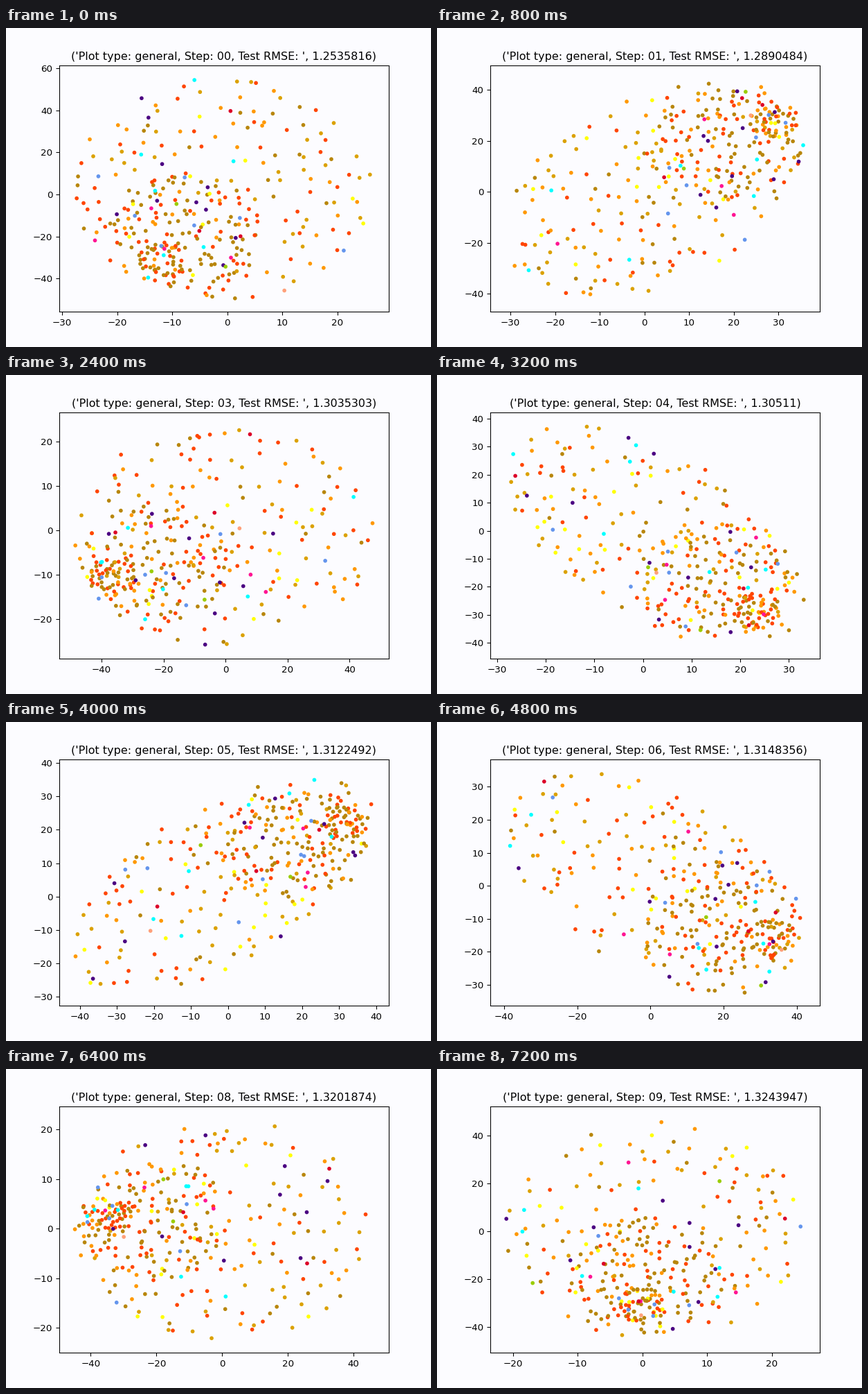
A matplotlib script for the animation above (8000 ms loop, 614 by 460 pixels).

```python
import numpy as np
import matplotlib.pyplot as plt
from matplotlib.animation import FuncAnimation

W, H, DPI = 614, 460, 96
PAPER = "#fcfcff"
MARGIN = 1 / 1.1                        # data fills the axes up to a 5 % border

COMMON = ["#b8860b", "#ff9800", "#ff4500", "#dba100", "#ffff00"]
DENSE = [.42, .18, .30, .06, .04]       # goldenrod and orange-red near the pole
SPARSE = [.14, .25, .24, .28, .09]      # lighter tones further out
RARE = (["#00ffff"] * 7 + ["#4b0082"] * 10 + ["#6495ed"] * 7
        + ["#ff1493"] * 4 + ["#dc0028"] * 3 + ["#9acd00"] * 2 + ["#ffa07a"])

# RMSE, x limits, y limits, slant of the cloud, dense pole (axes run -1 to 1)
STEPS = [
    (1.2535816, (-30.54, 29.35), (-55.8, 61.1), 0, (-.38, -.60)),
    (1.2890484, (-34.53, 39.24), (-47.2, 49.5), .4, (.72, .56)),
    (1.2967218, (-41.2, 37.6), (-44.5, 46.8), -.4, (-.70, .50)),
    (1.3035303, (-53.69, 52.65), (-28.94, 26.5), 0, (-.68, -.34)),
    (1.30511, (-31.46, 36.36), (-45.67, 42.06), -.55, (.62, -.62)),
    (1.3122492, (-45.56, 43.38), (-32.8, 41.0), .6, (.73, .50)),
    (1.3148356, (-43.8, 46.3), (-36.4, 38.2), -.5, (.70, -.45)),
    (1.3164245, (-51.11, 52.06), (-23.5, 23.7), 0, (.77, .04)),
    (1.3201874, (-49.6, 50.7), (-25.1, 24.6), 0, (-.70, .10)),
    (1.3243947, (-23.5, 27.39), (-50.7, 51.97), 0, (-.08, -.62)),
]


def disc(rng, n, center, radius, slant=0):
    """Spaced random dots in a disc; each is the freer of two candidates."""
    pts = []
    for _ in range(n):
        a = rng.uniform(0, 2 * np.pi, 2)
        r = radius * np.sqrt(rng.uniform(0, 1, 2))
        x, y = r * np.cos(a), r * np.sin(a)
        cand = np.column_stack([x, slant * x + np.sqrt(1 - slant**2) * y])
        if pts:
            gaps = np.linalg.norm(cand[:, None] - np.array(pts), axis=2)
            pts.append(cand[gaps.min(axis=1).argmax()])
        else:
            pts.append(cand[0])
    return np.array(pts) + center


def make_cloud(step, xlim, ylim, slant, pole):
    rng = np.random.default_rng(70 + step)
    pole = np.array(pole)
    pts = np.vstack([disc(rng, 175, 0, MARGIN, slant),
                     disc(rng, 125, .6 * pole, .47),
                     disc(rng, 38, pole, .15)])
    pts = rng.permutation(pts)
    near = np.linalg.norm(pts - pole, axis=1) < .7
    cols = np.where(near, rng.choice(COMMON, len(pts), p=DENSE),
                    rng.choice(COMMON, len(pts), p=SPARSE))
    cols[-len(RARE):] = RARE
    low, high = np.transpose([xlim, ylim])
    return low + (pts + 1) / 2 * (high - low), cols


clouds = [make_cloud(i, *s[1:]) for i, s in enumerate(STEPS)]

plt.rcParams["font.family"] = "DejaVu Sans"
fig = plt.figure(figsize=(W / DPI, H / DPI), dpi=DPI, facecolor=PAPER)
# default axes box of a 6.4 x 4.8 inch figure
ax = fig.add_axes([.8 * DPI / W, .528 * DPI / H, 4.96 * DPI / W, 3.696 * DPI / H],
                  facecolor=PAPER)
dots = ax.scatter([], [], s=30, marker=".", linewidths=1.5)
title = ax.set_title("", fontsize=12)


def update(i):
    rmse, xlim, ylim = STEPS[i][:3]
    pts, cols = clouds[i]
    ax.set_xlim(xlim)
    ax.set_ylim(ylim)
    dots.set_offsets(pts)
    dots.set_color(cols)
    title.set_text(f"('Plot type: general, Step: {i:02d}, Test RMSE: ', {rmse})")
    return dots, title


anim = FuncAnimation(fig, update, frames=len(STEPS), interval=800,
                     init_func=lambda: update(0), repeat=True, repeat_delay=0)
plt.show()
```
